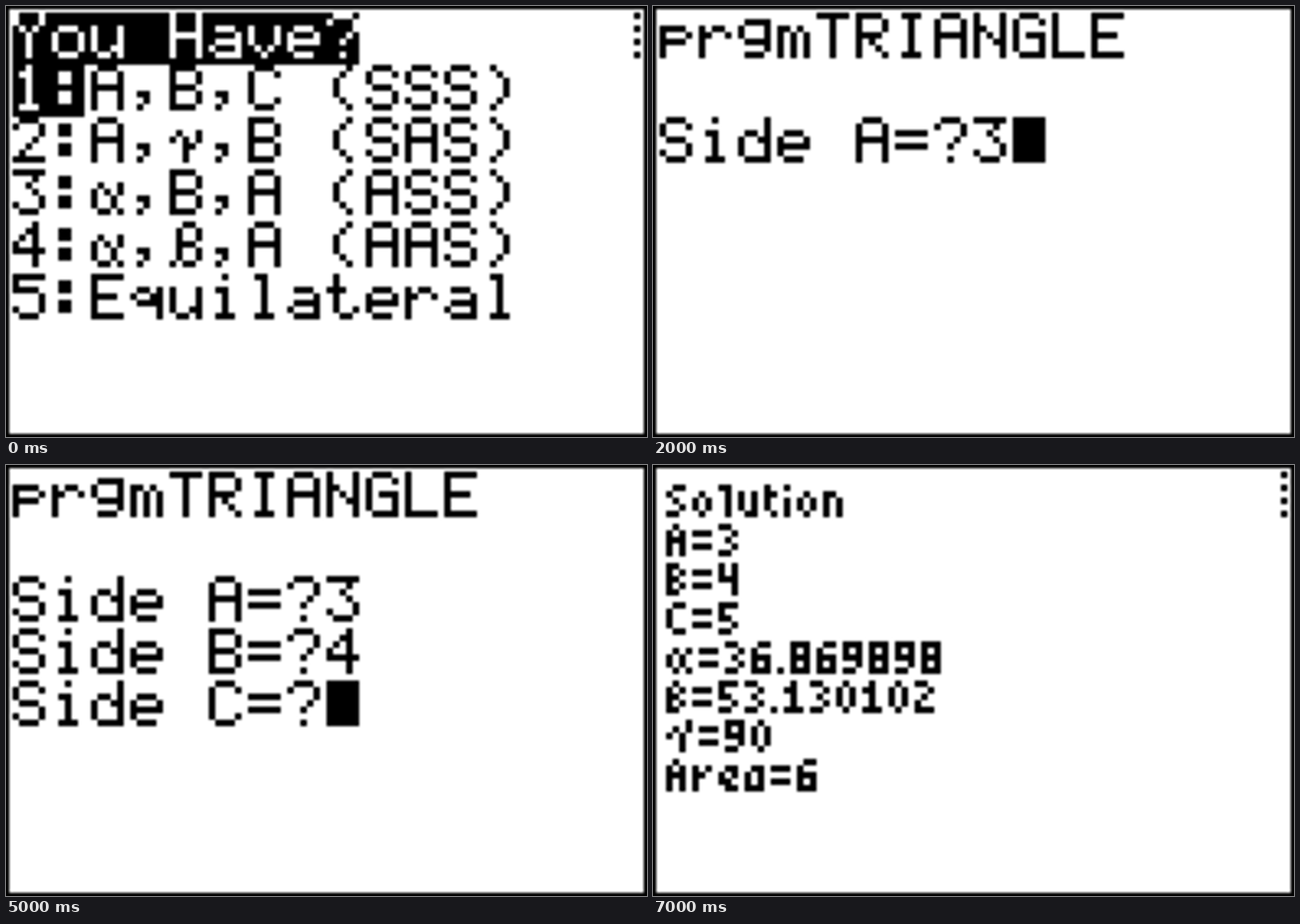
An HTML page with a canvas for the animation above (8000 ms loop, 768 by 517 pixels).

```html
<!DOCTYPE html>
<html lang="en">
<head>
<meta charset="utf-8">
<title>Triangle solver</title>
<style>
  html, body { margin: 0; width: 100%; height: 100%; overflow: hidden; background: #fff; }
  canvas { display: block; }
</style>
</head>
<body>
<canvas id="stage" width="768" height="517"></canvas>
<script>
// Stroke fonts: each letter is a set of polylines, points written as "xy".
const capitals = {
  A: '06 01 10 30 41 46|03 43',
  B: '00 06 36 45 44 33 03|00 30 41 42 33',
  C: '41 30 10 01 05 16 36 45',
  E: '40 00 06 46|03 33',
  G: '41 30 10 01 05 16 46 43 23',
  H: '00 06|40 46|03 43',
  I: '10 30|20 26|16 36',
  L: '00 06 46',
  N: '00 06|40 46|12 34',
  R: '06 00 30 41 42 33 03|24 46',
  S: '41 30 10 01 02 13 33 44 45 36 16 05',
  T: '00 40|20 26',
  Y: '00 01 23 41 40|23 26'
};

const lowercase = {
  a: '12 32 43 46 16 05 14 44',
  d: '40 46 16 05 03 12 22 33 43',
  e: '04 44 43 32 12 03 05 16 36',
  g: '44 14 03 02 11 41 45 36 16',
  i: '20|12 22 26|16 36',
  l: '10 20 26|16 36',
  m: '06 02 12 23 26|32 43 46',
  o: '03 12 32 43 45 36 16 05 03',
  p: '06 02 32 43 34 04',
  q: '42 46|44 14 03 12 22 33',
  r: '02 06|13 22 32 43',
  t: '10 15 26 36 45|02 22',
  u: '02 05 16 26 35|42 46',
  v: '02 04 26 44 42',
  α: '42 43 34 35 26 16 05 03 12 34|35 46',
  β: '06 15 11 20 30 41 42 33 13|33 44 45 36 26 15',
  γ: '03 12 23 26|42 43 25'
};

const symbols = {
  1: '11 20 26|16 36',
  2: '01 10 30 41 42 06 46',
  3: '00 40 22 44 45 36 16 05',
  4: '36 30 03 04 44',
  5: '40 00 02 32 43 45 36 16 05',
  ':': '11 21|12 22|14 24|15 25',
  ',': '14 24 25 16',
  '(': '30 12 14 36',
  ')': '10 32 34 16',
  '=': '02 42|04 44',
  '?': '01 10 30 41 42 24|26'
};

const smallLetters = {
  A: '04 01 10 21 24|02 22',
  B: '00 04 14 23 12 02|00 10 21 12',
  C: '20 10 01 03 14 24',
  S: '20 10 01 23 14 04',
  a: '21 11 02 04 24 21',
  e: '21 11 02 03 14 24|22 13',
  i: '00|02 04',
  l: '00 10 14',
  n: '04 01 11 22 24',
  o: '02 11 22 23 14 03 02',
  r: '01 04|12 21',
  t: '00 03 14|01 11',
  u: '01 03 14 24 21',
  α: '31 22 23 14 03 02 11 22|23 34',
  β: '04 01 10 21 12 23 14 04|02 12',
  γ: '02 11 22 24|30 31 22'
};

const smallSymbols = {
  0: '01 10 21 23 14 03 01',
  1: '01 10 14|04 24',
  2: '00 10 21 03 04 24',
  3: '00 10 21 12 23 14 04',
  4: '00 02 22|20 24',
  5: '20 00 02 12 23 14 04',
  6: '20 10 01 04 24 22 02',
  8: '00 20 24 04 00|02 22',
  9: '22 02 00 20 23 14 04',
  '=': '01 21|03 23',
  '.': '04'
};

const largeFont = { ...capitals, ...lowercase, ...symbols };
const smallFont = { ...smallLetters, ...smallSymbols };

// The LCD has 96 x 64 dots of two units each, inside a thin frame.
const lcd = document.createElement('canvas');
lcd.width = 196;
lcd.height = 132;
const dots = lcd.getContext('2d');
const stage = document.getElementById('stage').getContext('2d');

function fillDots(x, y, w = 1, h = 1, color = '#000') {
  dots.fillStyle = color;
  dots.fillRect(2 + 2 * x, 2 + 2 * y, 2 * w, 2 * h);
}

function drawSegment([x0, y0], [x1, y1], left, top, color) {
  const steps = Math.max(Math.abs(x1 - x0), Math.abs(y1 - y0));
  for (let i = 0; i <= steps; i++) {
    const k = steps ? i / steps : 0;
    fillDots(left + Math.round(x0 + (x1 - x0) * k), top + Math.round(y0 + (y1 - y0) * k), 1, 1, color);
  }
}

// Returns the width of the glyph in dots.
function drawGlyph(strokes, left, top, color) {
  let width = 0;
  for (const stroke of strokes.split('|')) {
    const points = stroke.split(' ').map(p => [+p[0], +p[1]]);
    points.forEach((p, i) => {
      drawSegment(points[Math.max(i - 1, 0)], p, left, top, color);
      width = Math.max(width, p[0] + 1);
    });
  }
  return width;
}

function print(text, row, column = 0, color = '#000') {
  [...text].forEach((ch, i) => {
    if (ch !== ' ') drawGlyph(largeFont[ch], 6 * (column + i), 8 * row, color);
  });
}

function printInverse(text, row) {
  fillDots(0, 8 * row, 6 * text.length - 1, 8);
  print(text, row, 0, '#fff');
}

function printSmall(text, x, y) {
  for (const ch of text) x += drawGlyph(smallFont[ch], x, y, '#000') + 1;
}

function drawBusyMark() {
  for (let y = 0; y < 8; y += 2) fillDots(95, y);
}

function drawMenu() {
  printInverse('You Have?', 0);
  printInverse('1:', 1);
  print('A,B,C (SSS)', 1, 2);
  ['2:A,γ,B (SAS)', '3:α,B,A (ASS)', '4:α,β,A (AAS)', '5:Equilateral']
    .forEach((line, i) => print(line, i + 2));
  drawBusyMark();
}

function drawInput(step) {
  print('prgmTRIANGLE', 0);
  const current = Math.floor(step / 2);
  for (let i = 0; i <= current; i++) {
    const answered = i < current || step % 2 === 1;
    const line = `Side ${'ABC'[i]}=?${answered ? 3 + i : ''}`;
    print(line, i + 2);
    if (i === current) fillDots(6 * line.length, 8 * (i + 2), 5, 7);
  }
}

function drawSolution() {
  ['Solution', 'A=3', 'B=4', 'C=5', 'α=36.869898', 'β=53.130102', 'γ=90', 'Area=6']
    .forEach((line, i) => printSmall(line, 1, 2 + 6 * i));
  drawBusyMark();
}

function drawScreen(second) {
  dots.fillStyle = '#000';
  dots.fillRect(0, 0, 196, 132);
  dots.fillStyle = '#fff';
  dots.fillRect(1, 1, 194, 130);

  if (second === 0) drawMenu();
  else if (second < 7) drawInput(second - 1);
  else drawSolution();

  stage.imageSmoothingEnabled = true;
  stage.imageSmoothingQuality = 'high';
  stage.drawImage(lcd, 0, 0, 768, 517);
}

let shown = -1;
const start = performance.now();
function tick() {
  const second = Math.floor((performance.now() - start) / 1000) % 8;
  if (second !== shown) drawScreen(shown = second);
  requestAnimationFrame(tick);
}
tick();
</script>
</body>
</html>
```
